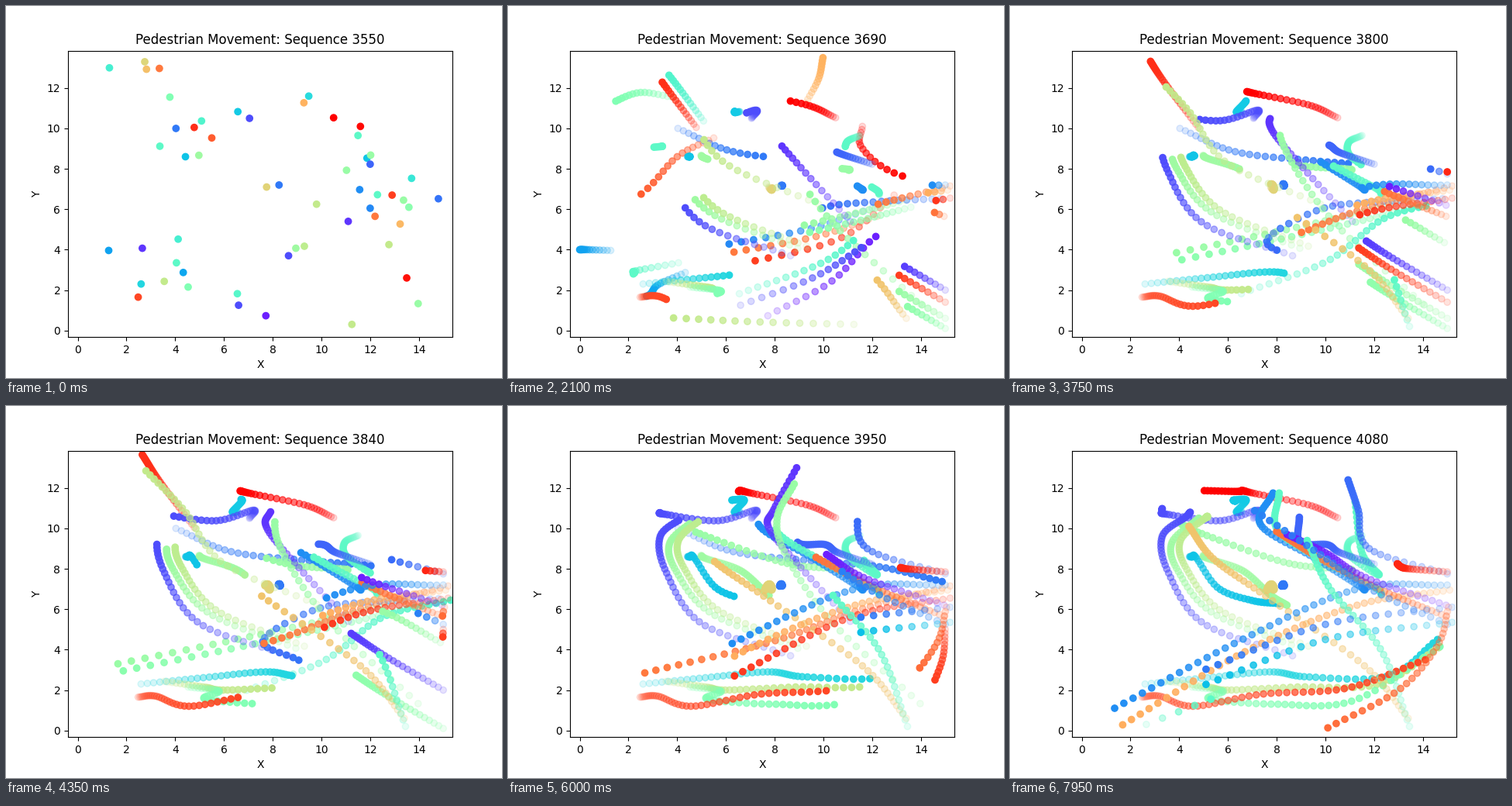
Animation of 640 by 480 pixels, one loop 8 s. Source, as a matplotlib script:

```python
import math
import matplotlib.pyplot as plt
import numpy as np
from matplotlib.animation import FuncAnimation

LAST = 53              # last step of the loop
INTERVAL = 50          # ms per tick
TICKS_PER_STEP = 3     # the picture changes every 150 ms
TICKS = 160
FIRST_SEQUENCE = 3550
FAINTEST = 0.15
EXIT_SPEED = 0.35

walkers = []


def add(hue, start, path):
    walkers.append((start, np.asarray(path), plt.cm.rainbow(float(hue))))


def walk(hue, start, stop, *points, shift=(0, 0)):
    """Smooth route through points reached at equal time spacing."""
    points = np.array(points, float) + shift
    slopes = np.gradient(points, axis=0)
    t = np.linspace(0, len(points) - 1, stop - start + 1)
    i = np.minimum(t.astype(int), len(points) - 2)
    u = (t - i)[:, None]
    add(hue, start, (1 + 2 * u) * (1 - u) ** 2 * points[i]
        + u * (1 - u) ** 2 * slopes[i]
        + u * u * (3 - 2 * u) * points[i + 1]
        + u * u * (u - 1) * slopes[i + 1])


def pair(hues, start, stop, *points, shift):
    """Two people on the same route, side by side."""
    walk(hues[0], start, stop, *points)
    walk(hues[1], start, stop, *points, shift=shift)


def linger(hue, x, y, reach):
    """Stand about, swaying slowly."""
    t = np.arange(LAST + 1)
    add(hue, 0, np.column_stack([x + reach * np.sin(t / 8),
                                 y - reach * np.sin(t / 5)]))


def leave(hue, x, y):
    """Walk straight out through the nearer side."""
    way = math.copysign(EXIT_SPEED, x - 7.5)
    t = np.arange(8)
    add(hue, 0, np.column_stack([x + way * t, np.full(8, y)]))


# people on their way out
leave(.39, 1.3, 13)
leave(.68, 2.75, 13.3)
leave(.07, 2.65, 4.07)
leave(.36, 13.7, 7.53)
leave(.74, 13.23, 5.27)
leave(.63, 12.77, 4.25)
leave(.98, 13.5, 2.6)
walk(.73, 0, 9, (2.82, 12.93), (2.47, 13.55))
walk(.84, 0, 9, (3.35, 12.97), (3.23, 13.57))
walk(.39, 0, 8, (4.12, 4.52), (2, 4.1), (-.05, 3.4))
walk(.22, 0, 14, (1.27, 3.96), (.3, 4), (0, 4))

# upper left
walk(.5, 0, 21, (3.78, 11.55), (2.5, 11.78), (1.48, 11.35), (.85, 10.85))
walk(.16, 0, 40, (4.03, 10), (6.3, 8.85), (9.5, 8.4), (12.3, 8.1), (14.87, 7.37))
walk(.94, 0, 29, (4.78, 10.05), (3.35, 12.35), (2.65, 13.65))
walk(.41, 0, 21, (5.08, 10.37), (3.98, 12.15), (3.08, 13.5))
walk(.88, 0, 21, (5.5, 9.53), (4, 8.6), (2.52, 6.75), (-.13, 4.7))
walk(.28, 0, LAST, (4.42, 8.6), (4.5, 8.6), (4.55, 8.6), (4.7, 8.55),
     (5.6, 7.05), (7, 6.43), (8.1, 6.28))
walk(.56, 0, LAST, (4.97, 8.67), (5.2, 8.5), (6.62, 7.9), (7.75, 6.7), (8.42, 6.2))
walk(.43, 0, 21, (3.37, 9.12), (3.3, 9.1), (2.35, 9))

# upper middle
walk(.29, 0, LAST, (6.57, 10.83), (6.35, 10.83), (6.75, 11.4), (6.25, 11.4),
     (6.3, 11.35))
walk(.1, 0, LAST, (7.05, 10.5), (7.2, 10.9), (5.65, 10.38), (3.5, 10.7),
     (3.3, 10.8), (3.3, 10.98))
walk(.33, 0, 12, (9.48, 11.6), (10.05, 12.4), (10.2, 13.7))
walk(.75, 0, 14, (9.28, 11.27), (9.8, 12.45), (9.98, 13.5))
walk(1, 0, LAST, (10.5, 10.53), (9.35, 11.15), (7.1, 11.73), (6.6, 11.87),
     (6.4, 11.83), (5.03, 11.87))
walk(.985, 0, 19, (11.6, 10.1), (11.55, 9.1), (12.8, 7.85), (15.3, 7))

# right half
walk(.43, 0, LAST, (11.5, 9.65), (10.95, 9.3), (11.05, 8.6), (12.2, 7.7),
     (11.5, 8.8), (11.22, 11.3))
walk(.55, 0, LAST, (11.03, 7.93), (10.85, 8), (8.4, 8.3), (4.8, 9.8), (4.1, 10.2))
pair((.28, .55), 0, 10, (11.87, 8.53), (12.9, 8.25), (15, 7.45), shift=(.15, .15))
walk(.13, 0, LAST, (12, 8.23), (10.6, 8.8), (10.07, 9.2), (8.95, 9.3), (8.93, 10.55))
walk(.19, 0, LAST, (11.57, 6.97), (11.45, 7.1), (9.6, 8.5), (7.35, 10.17),
     (7.85, 11.75))
pair((.18, .84), 0, 21, (12, 6.05), (9.5, 5.05), (6.13, 4.28), (2.55, 3.55),
     shift=(.2, -.4))
walk(.92, 0, 21, (12.9, 6.7), (10.75, 4.6), (7.2, 3.45), (3.25, 2.65))
walk(.43, 0, LAST, (12.3, 6.72), (12.05, 7.05), (10.1, 8.3), (8.05, 9.9), (8.1, 11.75))
pair((.55, .52), 0, 29, (13.37, 6.45), (10.8, 5.65), (6.9, 4.6), (1.65, 3.3),
     shift=(.22, -.35))
walk(.15, 0, 29, (14.8, 6.52), (12.3, 6.38), (9.8, 6), (7.6, 4.45), (9.07, 3.48))
walk(.07, 0, 40, (11.1, 5.4), (8.9, 8.3), (7.75, 10.05), (7.97, 10.95), (8.9, 13))

# centre
linger(.69, 7.75, 7.1, .15)
linger(.16, 8.26, 7.2, .05)
walk(.63, 0, 29, (9.8, 6.25), (5.95, 8.3), (4.4, 10.85), (2.8, 12.85))
pair((.56, .62), 0, LAST, (8.95, 4.07), (5.4, 5.8), (3.95, 7.9), (3.7, 9.3),
     (4.7, 10.4), (4.8, 10.45), shift=(.35, .1))
walk(.1, 0, LAST, (8.65, 3.7), (5, 5.3), (3.55, 7.83), (3.3, 9.6), (4.25, 10.55),
     (4.45, 10.8))
walk(.55, 0, 40, (13.97, 1.33), (10.4, 5.3), (8.5, 8.6), (8.1, 10.5), (8.8, 12.2))

# lower left
walk(.63, 0, 21, (11.25, .3), (7.4, .42), (3.85, .62), (-.03, .87))
walk(.04, 0, 21, (7.72, .73), (10.35, 2.45), (12.15, 4.65), (14.22, 5.85))
walk(.42, 0, 29, (6.55, 1.82), (10.1, 3.45), (12.5, 5.6), (15.3, 6.45))
walk(.1, 0, 21, (6.6, 1.25), (9.55, 2.6), (11.55, 4.1), (13.2, 5.55))
walk(.43, 0, 21, (4.05, 3.35), (2.3, 2.95), (2.2, 2.8), (1.15, 2))
walk(.23, 0, 21, (4.33, 2.87), (3.2, 2.25), (2.75, 1.7), (1.4, 1.45))
walk(.32, 0, LAST, (2.6, 2.3), (5.3, 2.63), (7.75, 2.9), (9.3, 2.65),
     (12.6, 2.7), (14.6, 4.5))
walk(.63, 0, LAST, (3.55, 2.43), (5.2, 2.15), (6, 2), (8.8, 2.15),
     (12.2, 2.3), (14.65, 4.1))
walk(.5, 0, LAST, (4.53, 2.15), (5.8, 1.95), (5.25, 1.55), (8, 1.3),
     (11.2, 1.5), (14.7, 4.15))
walk(.91, 0, LAST, (2.48, 1.65), (3.2, 1.7), (4.6, 1.2), (7.4, 1.8),
     (10.9, 2.1), (14.1, 3.5))

# four abreast from the lower right
for hue, drop, stop in [(.08, 0, 30), (.92, .6, 27), (.55, 1.4, 27), (.53, 1.9, 32)]:
    walk(hue, 6, stop, (15, 2), (12.6, 3.7), (11.1, 4.9), shift=(0, -drop))

# arrivals from the right and from below
walk(.84, 5, 40, (15.2, 7.15), (11.4, 5.95), (7.9, 4.4), (2.67, 2.85))
walk(.72, 5, LAST, (13.4, .6), (11.6, 3.2), (7.55, 6.65), (5.4, 8.5), (4.4, 10.1))
walk(.76, 11, LAST, (15.1, 6.95), (11.3, 6.2), (6.7, 3.9), (1.68, .28))
walk(.93, 12, 40, (15.2, 6.55), (11.1, 5.6), (6.35, 2.7))
walk(.85, 12, LAST, (14.95, 5.65), (12.3, 6.95), (9.8, 8.5), (8, 9.85))
walk(.19, 12, LAST, (15, 7.2), (11.3, 7), (6.5, 4.45), (1.35, 1.1))
walk(.55, 17, 37, (14.88, 4.35), (12.9, 5.7), (11, 6.5))
walk(.04, 17, LAST, (14.95, 6.2), (11.65, 7.57), (10, 8.8), (8.43, 9.7))
walk(.43, 18, LAST, (13.45, .2), (12.3, 3.95), (10.2, 7), (9.25, 9.4))
walk(.14, 23, LAST, (15, 7.75), (11.8, 9), (11.35, 10.9), (10.93, 12.4))
walk(.95, 25, LAST, (15, 7.85), (13.45, 8), (13.1, 8.1), (12.95, 8.25))
walk(.17, 26, LAST, (15, 5.25), (12, 6.9), (9.8, 8.7), (7.1, 10.88))
walk(.86, 27, LAST, (15.05, 6.1), (14.6, 4.2), (13, 2), (10.1, .13))
walk(.92, 27, 42, (15, 5), (14.9, 3.6), (14.45, 2.1))
pair((.27, .16), 33, LAST, (15.2, 5.35), (10, 4.5), (5.1, 2.28), shift=(0, .75))
walk(.43, 49, LAST, (2.65, .3), (5.3, 1.55))


fig, ax = plt.subplots(figsize=(6.4, 4.8), dpi=100)
ax.set(xlim=(-.4, 15.375), ylim=(-.327, 13.85), xlabel="X", ylabel="Y")
title = ax.set_title("")
dots = ax.scatter([], [])


def draw(tick):
    step = tick // TICKS_PER_STEP
    offsets, colors = [], []
    for start, path, color in walkers:
        n = step - start + 1
        if 1 <= n <= len(path):
            trail = np.tile(color, (n, 1))
            trail[:, 3] = np.linspace(1, FAINTEST, n)[::-1]
            offsets.append(path[:n])
            colors.append(trail)
    colors = np.vstack(colors)
    dots.set_offsets(np.vstack(offsets))
    dots.set_facecolors(colors)
    dots.set_edgecolors(colors)
    title.set_text(f"Pedestrian Movement: Sequence {FIRST_SEQUENCE + 10 * step}")
    return dots, title


anim = FuncAnimation(fig, draw, frames=TICKS, interval=INTERVAL,
                     repeat=True, repeat_delay=0)
plt.show()
```
